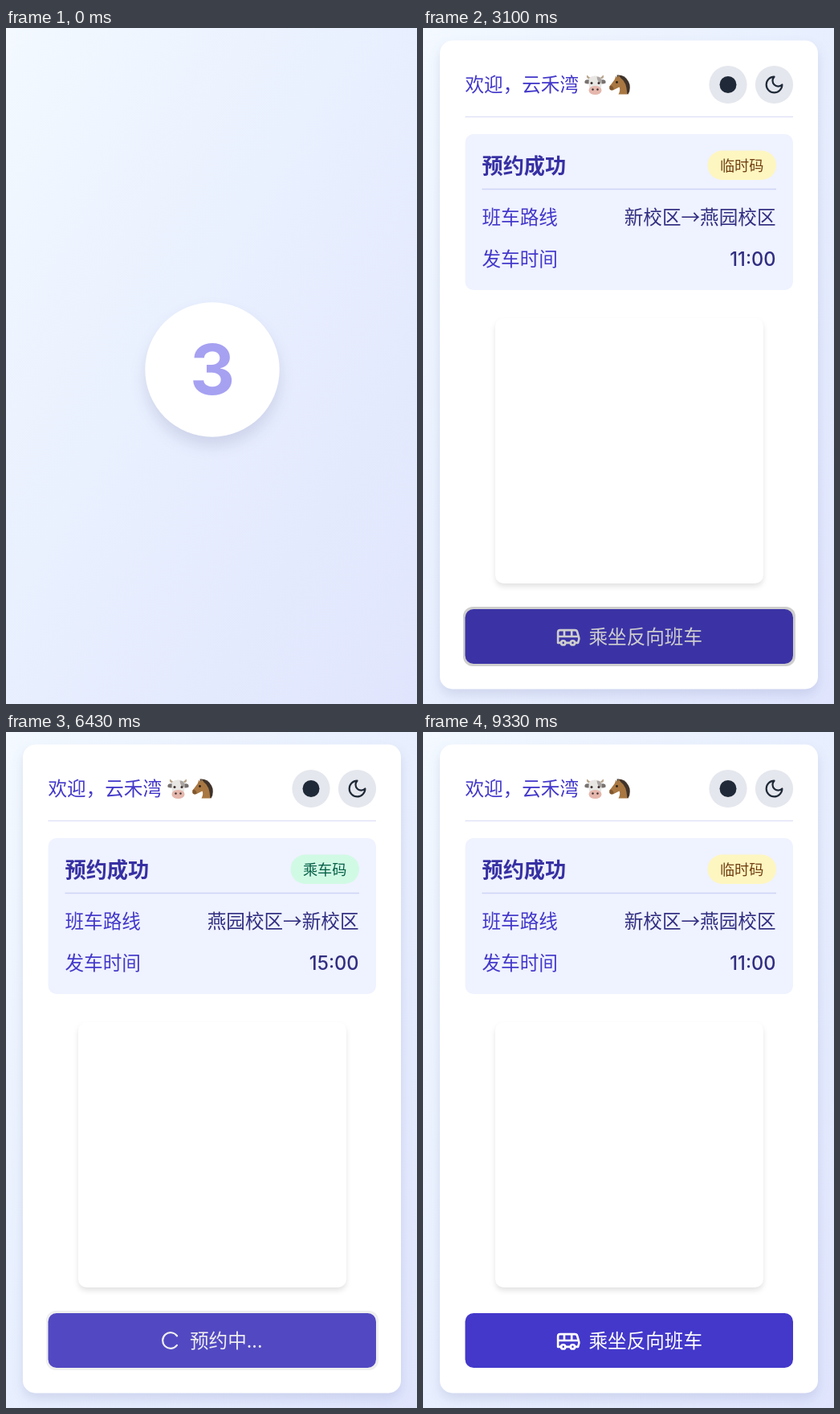
Recreate the animation shown at these times as an HTML page. Size 512 by 841 pixels, loop 9.36 s.

```html
<!DOCTYPE html>
<html lang="zh-CN">
<head>
<meta charset="utf-8">
<style>
html, body { margin: 0; width: 100%; height: 100%; overflow: hidden; }
body { background: linear-gradient(to bottom right, #f3f9ff, #e8effe 48%, #e0e5fd); }
svg { display: block; width: 100vw; height: 100vh; }
text { font: 400 23.6px "Noto Sans CJK SC", "Noto Sans CJK", sans-serif; }
.latin { font-family: Inter, sans-serif; }
.icon { fill: none; stroke: currentColor; stroke-width: 2; stroke-linecap: round; stroke-linejoin: round; }
.label { fill: #4338ca; }
.value { fill: #312e81; font-weight: 500; text-anchor: end; }
.white { fill: #fff; color: #fff; }
#digit { font: 700 124px Inter, sans-serif; fill: #4f46e5; text-anchor: middle; }
.disc { filter: drop-shadow(0 11px 9px rgba(40,40,100,.13)); }
.card { filter: drop-shadow(0 7px 7px rgba(50,60,130,.13)); }
.code { filter: drop-shadow(0 4px 3px rgba(0,0,0,.11)); }
</style>
</head>
<body>
<svg viewBox="0 0 512 841" preserveAspectRatio="none">
  <g id="count">
    <circle class="disc" cx="257" cy="425" r="83.7" fill="#fff"/>
    <text id="digit" x="257" y="469"></text>
  </g>

  <g id="page">
    <rect class="card" x="21" y="15.5" width="471" height="807" rx="15.8" fill="#fff"/>
    <text class="label" x="52.5" y="79">欢迎，云禾湾</text>

    <g id="cow" transform="translate(214.500 70.500)">
      <path d="M-8-7Q-12-9-10-12Q-8-9-5-9M8-7Q12-9 10-12Q8-9 5-9" fill="#b9a68c"/>
      <path d="M-7-6Q-14-7-13-2Q-9 0-6-2M7-6Q14-7 13-2Q9 0 6-2" fill="#77716f"/>
      <path d="M-7-9Q0-13 7-9Q9-3 7 5Q0 13-7 5Q-9-3-7-9" fill="#e9e7e4"/>
      <path d="M2-10Q9-10 8-2Q3-1 2-10" fill="#aaa5a3"/>
      <ellipse cy="7" rx="8" ry="5.500" fill="#e5b7ad"/>
      <g fill="#3c3030">
        <circle cx="-4.500" cy="-2" r="1.500"/><circle cx="4.500" cy="-2" r="1.500"/>
        <circle cx="-3" cy="6" r="1.200"/><circle cx="3" cy="6" r="1.200"/>
      </g>
    </g>
    <g id="horse" transform="translate(244.500 70.500)">
      <path d="M-3-12Q9-13 13 0Q14 8 11 12L2 9Z" fill="#40332a"/>
      <path d="M-1-12L2-8Q9-4 10 12H-1Q2 6 0 3L-8 7Q-13 7-12 2L-6-6L-4-11L-2-8Z" fill="#a87742"/>
      <path d="M-11 1Q-7 2-7 6Q-13 9-12 2" fill="#80572f"/>
      <circle cx="-3" cy="-3" r="1.400" fill="#2b211a"/>
    </g>

    <circle cx="380" cy="70.500" r="23.600" fill="#e5e7ee"/>
    <circle cx="380" cy="70.500" r="10.500" fill="#1f2937"/>
    <circle cx="437.500" cy="70.500" r="23.600" fill="#e5e7ee"/>
    <g class="icon" color="#1f2937" transform="translate(424.400 57.400) scale(1.094)">
      <path d="M12 3a6 6 0 0 0 9 9 9 9 0 1 1-9-9Z"/>
    </g>
    <path d="M52.500 110.500H461" stroke="#e0e2f8" stroke-width="1.400"/>

    <rect x="52.500" y="132" width="408.500" height="194" rx="10.500" fill="#eff2ff"/>
    <text x="73.500" y="181" fill="#3730a3" style="font-size:26.2px;font-weight:600">预约成功</text>
    <rect id="badge" x="354.500" y="152.500" width="85.500" height="36.500" rx="18.250"/>
    <text id="badgeText" x="397.200" y="178" text-anchor="middle" style="font-size:18.2px;font-weight:500"></text>
    <path d="M73.500 200.500H440" stroke="#cdd4f5" stroke-width="1.400"/>
    <text class="label" x="73.500" y="244">班车路线</text>
    <text class="value" id="route" x="439.500" y="244"></text>
    <text class="label" x="73.500" y="296">发车时间</text>
    <text class="value latin" id="depart" x="439.500" y="295.500"></text>

    <rect class="code" x="90" y="361" width="334" height="330" rx="10.500" fill="#fff"/>

    <g id="button">
      <rect x="52.500" y="723" width="408.500" height="68" rx="10.500" fill="#4338ca"/>
      <g id="idle" class="white">
        <g class="icon" transform="translate(165.500 741.300) scale(1.312)">
          <path d="M8 6v6M15 6v6M2 12h19.600M18 18h3s.5-1.700.8-2.800c.1-.4.2-.8.2-1.200 0-.4-.1-.8-.2-1.200l-1.400-5C20.100 6.800 19.100 6 18 6H4a2 2 0 0 0-2 2v10h3M9 18h5"/>
          <circle cx="7" cy="18" r="2"/><circle cx="16" cy="18" r="2"/>
        </g>
        <text x="206.500" y="766" style="font-weight:500">乘坐反向班车</text>
      </g>
      <g id="busy" class="white">
        <g class="icon" transform="translate(205 757) scale(1.094)">
          <path id="spinner" d="M9 0a9 9 0 1 1-6.219-8.560"/>
        </g>
        <text x="229" y="766" style="font-weight:500">预约中...</text>
      </g>
    </g>
    <rect id="tap" x="50" y="720" width="414" height="74" rx="12" fill="#222"/>

    <g id="toast">
      <rect class="code" x="142" y="15.500" width="230" height="62.500" rx="8" fill="#10b981"/>
      <g class="icon white" style="fill:none" transform="translate(172.500 31) scale(1.312)">
        <path d="M21.801 10A10 10 0 1 1 17 3.335M9 11l3 3L22 4"/>
      </g>
      <text class="white" x="214.500" y="55" style="font-size:21px">反向预约成功</text>
    </g>
  </g>
</svg>
<script>
const LOOP = 9360, PAGE_AT = 1500;
const $ = id => document.getElementById(id);
const ramp = (t, from, length) => Math.min(1, Math.max(0, (t - from) / length));
const easeOut = p => 1 - (1 - p) ** 3;
const show = (id, opacity) => {
  $(id).style.opacity = opacity;
  $(id).style.display = opacity > 0 ? '' : 'none';
};

const digits = [['3', -150, 400], ['2', 400, 950], ['1', 950, 1560]];
const rides = [{ tap: 3030, done: 3900 }, { tap: 6230, done: 7100 }];
const outbound = { badge: '临时码', fill: '#fef6c0', ink: '#713f12', route: '新校区→燕园校区', depart: '11:00' };
const inbound = { badge: '乘车码', fill: '#d1fae5', ink: '#065f46', route: '燕园校区→新校区', depart: '15:00' };

function drawCount(t) {
  show('count', 1 - ramp(t, PAGE_AT, 120));
  const [label, start, end] = digits.find(d => t < d[2]) || digits[2];
  const p = Math.min(ramp(t, start, 300), 1 - ramp(t, end - 120, 120));
  const scale = 0.4 + 0.6 * p;
  $('digit').textContent = label;
  $('digit').setAttribute('opacity', p);
  $('digit').setAttribute('transform', `translate(257 424) scale(${scale}) translate(-257 -424)`);
}

function drawTicket(t) {
  const ticket = t >= rides[0].done && t < rides[1].done ? inbound : outbound;
  $('badge').setAttribute('fill', ticket.fill);
  $('badgeText').setAttribute('fill', ticket.ink);
  $('badgeText').textContent = ticket.badge;
  $('route').textContent = ticket.route;
  $('depart').textContent = ticket.depart;
}

function drawRide(t) {
  const { tap, done } = t < 6100 ? rides[0] : rides[1];
  const load = tap + 100;
  const busy = t >= load && t < done;
  const dim = ramp(t, load, 250) - ramp(t, done, 200);
  show('idle', busy ? 0 : 1);
  show('busy', busy ? 1 : 0);
  show('tap', t < tap ? 0 : 0.22 * (1 - ramp(t, load, 150)));
  $('button').style.opacity = 1 - 0.25 * dim;
  $('spinner').setAttribute('transform', `rotate(${(t - load) * 0.36})`);

  const shown = easeOut(ramp(t, done, 300)) - ramp(t, done + 2000, 200);
  show('toast', shown);
  $('toast').setAttribute('transform', `translate(0 ${-60 * (1 - shown)})`);
}

function draw(t) {
  drawCount(t);
  const p = easeOut(ramp(t, PAGE_AT, 230));
  show('page', p);
  $('page').setAttribute('transform', `translate(256.5 419) scale(${0.97 + 0.03 * p}) translate(-256.5 -419)`);
  drawTicket(t);
  drawRide(t);
}

const began = performance.now();
function tick() {
  draw((performance.now() - began) % LOOP);
  requestAnimationFrame(tick);
}
tick();
</script>
</body>
</html>
```
